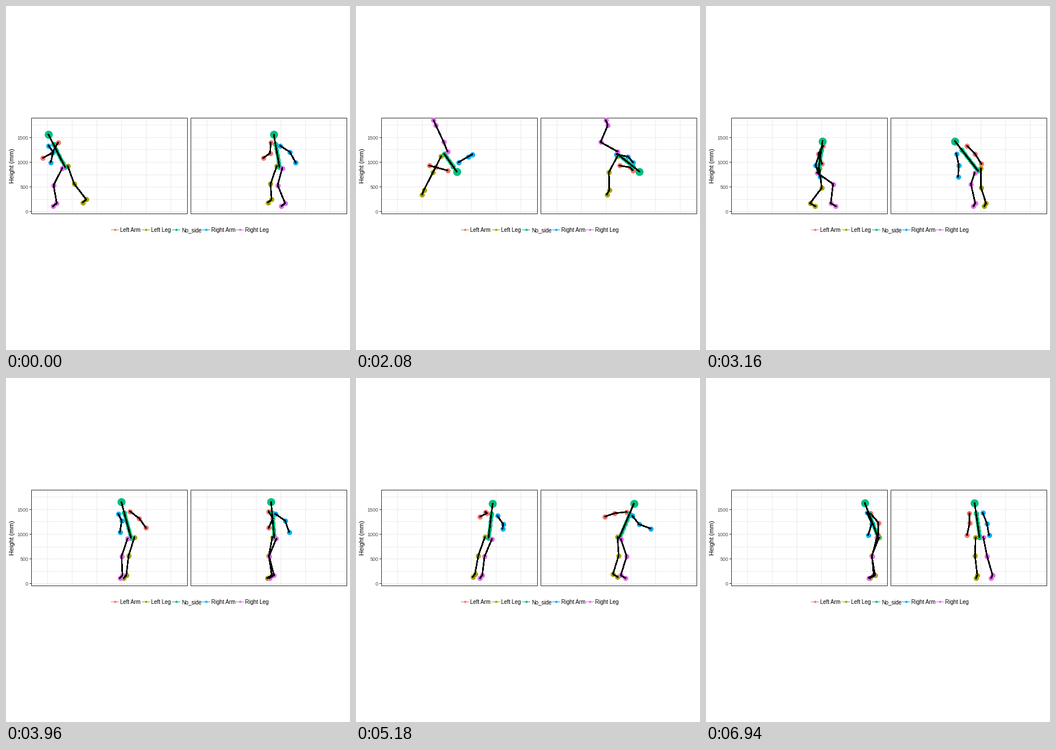
A matplotlib script for the animation above (6960 ms loop, 600 by 600 pixels).

```python
import numpy as np
import matplotlib.pyplot as plt
from matplotlib.animation import FuncAnimation
from matplotlib.patches import Rectangle

PX = 0.72  # points per pixel at 100 dpi
STEP, FRAMES = 20, 348
T = np.arange(FRAMES) * float(STEP)
FLOOR = 344  # ankle height of a standing foot

# Axes: x in the left panel, x in the right panel, y downwards.
# Swing angles: 0 hangs down, 90 points left, 180 up, 270 right.


def glide(*keys):
    """Monotone cubic through rows of (time, values...), one row per frame."""
    keys = np.array(keys, float)
    ts, ys = keys[:, 0], keys[:, 1:]
    h = np.diff(ts)[:, None]
    d = np.diff(ys, axis=0) / h
    m = np.vstack([d[:1], d[1:], d[-1:]])
    prod = d[:-1] * d[1:]
    same = prod > 0
    m[1:-1] = np.where(same, 2 * prod / np.where(same, d[:-1] + d[1:], 1), 0)
    i = np.clip(np.searchsorted(ts, T, side="right") - 1, 0, len(ts) - 2)
    u = (T[:, None] - ts[i, None]) / h[i]
    return ((1 + 2 * u) * (1 - u) ** 2 * ys[i] + u * (1 - u) ** 2 * h[i] * m[i]
            + u * u * (3 - 2 * u) * ys[i + 1] - u * u * (1 - u) * h[i] * m[i + 1])


def unit(v):
    return v / np.maximum(np.linalg.norm(v, axis=1, keepdims=True), 1e-6)


def swing(keys, length, tuck=0, rest=0, drop=np.inf):
    """Vector at a swing angle and sideways offset, never deeper than drop."""
    deg, side = keys.T
    ang = np.radians(deg)
    size = length - tuck * (1 - np.cos(ang - np.radians(rest))) / 2
    r = np.sqrt(size ** 2 - side ** 2)
    r = np.minimum(r, drop / np.maximum(np.cos(ang), 1e-3))
    return np.column_stack([-r * np.sin(ang), side, r * np.cos(ang)])


def middle(start, reach, bone, bend):
    """Knee or elbow between two equal bones, bent towards a direction."""
    axis = unit(reach)
    out = unit(bend - axis * np.sum(bend * axis, axis=1, keepdims=True))
    half = np.linalg.norm(reach, axis=1, keepdims=True) / 2
    return start + reach / 2 + out * np.sqrt(np.maximum(bone ** 2 - half ** 2, 0))


def arm(shoulder, keys):
    reach = swing(keys, 40)
    return [shoulder, middle(shoulder, reach, 21.5, -facing), shoulder + reach]


def leg(hip, keys):
    reach = swing(keys, 68, tuck=16, drop=FLOOR - hip[:, 2])
    ankle = hip + reach
    air = np.clip((FLOOR - 6 - ankle[:, 2:]) / 25, 0, 1)
    toe = (1 - air) * (9 * facing + [0, 0, 5]) + air * 10.5 * unit(reach)
    return [hip, middle(hip, reach, 34.5, facing), ankle, ankle + toe]


# lunge, cartwheel without hands, landing, half turn, steps backwards
pelvis = glide((0, 103, 477, 281), (720, 106, 475, 281), (1200, 112, 473, 286),
               (2080, 154, 456, 258), (2600, 184, 467, 273),
               (3160, 196, 474, 287), (3960, 218, 468, 279),
               (5180, 231, 459, 279), (6940, 300, 477, 278))
yaw = np.radians(glide((0, -135), (1200, -85), (2600, -90), (3160, -20),
                       (3960, -120), (5180, -245), (6940, -165)))
facing = np.column_stack([np.cos(yaw), np.sin(yaw), 0 * yaw])

trunk = swing(glide((0, 153, -7), (720, 167, -4), (1200, 201, -27),
                    (2080, 325, 27), (2850, 493, -14), (3160, 548, -28),
                    (3960, 525, -4), (5180, 547, 18), (6940, 519, -6)),
              46, tuck=9, rest=180)
neck, head = pelvis + trunk, pelvis + 1.42 * trunk
left = unit(np.cross(facing, trunk))

larm = arm(neck + 12 * left, glide(
    (0, 45, -13), (1200, -80, 25), (2080, 105, -23), (3160, 4, 25),
    (3960, -44, 0), (4550, 69, -12), (5180, 49, -38), (6940, -20, -4)))
rarm = arm(neck - 12 * left, glide(
    (0, -7, 27), (1200, 86, 30), (2080, 240, -29), (3160, 358, 3),
    (3960, 355, 24), (5180, 338, 32), (6940, 357, 11)))
lleg = leg(pelvis + 7 * left, glide(
    (0, -29, -9), (1200, -14, -19), (2080, 27, -14), (2600, 192, 32),
    (2850, 362, 34), (3160, 375, 9), (3960, 372, -1), (5180, 375, -8),
    (5700, 333, 2), (6940, 366, 3)))
rleg = leg(pelvis - 7 * left, glide(
    (0, 9, 5), (1200, 27, -11), (2080, 156, -17), (2600, 338, -4),
    (3160, 336, 1), (3960, 368, -4), (5180, 375, 0), (6250, 395, 10),
    (6940, 365, 16)))

# joints, colour, legend label, legend x
LIMBS = [
    (larm, "#F8766D", "Left Arm", 183),
    (lleg, "#A3A500", "Left Leg", 237),
    ([pelvis, neck, head], "#00BF7D", "No_side", 290),
    (rarm, "#00B0F6", "Right Arm", 342),
    (rleg, "#E76BF3", "Right Leg", 401),
]

fig = plt.figure(figsize=(6, 6), dpi=100, facecolor="white")
ax = fig.add_axes([0, 0, 1, 1])
ax.set_xlim(0, 600)
ax.set_ylim(600, 0)
ax.axis("off")


def line(x, y, color, width=1.0, **kw):
    return ax.plot(x, y, color=color, lw=width * PX, **kw)[0]


def dots(color, size, z):
    return ax.plot([], [], "o", color=color, ms=size * PX, mew=0,
                   antialiased=False, zorder=z)[0]


def label(x, y, s, size, **kw):
    ax.text(x, y, s, fontsize=size * PX, family="Liberation Sans", **kw)


# panels
for x0 in (44, 322):
    for y in 358.4 - 21.6 * np.arange(8):
        line([x0, x0 + 272], [round(y)] * 2, "#EBEBEB", zorder=0)
    for x in x0 + 28 + 43 * np.arange(6):
        line([x, x], [195, 362], "#EBEBEB", zorder=0)
    ax.add_patch(Rectangle((x0, 195), 272, 167, fill=False, ec="#333333",
                           lw=PX, zorder=1))
for k in range(4):
    y = round(358.4 - 43.2 * k)
    line([41, 44], [y, y], "#333333", zorder=1)
    label(39, y + 0.8, str(500 * k), 8.8, color="#4D4D4D", ha="right",
          va="center_baseline")
label(11.5, 279, "Height (mm)", 11, rotation=90, ha="center", va="center")

# legend and figure parts
parts = []
for z, (_, color, text, x) in enumerate(LIMBS, 2):
    line([x, x + 13], [390, 390], color)
    ax.plot(x + 7, 390, "o", color=color, ms=4 * PX, mew=0)
    label(x + 16, 394.5, text, 9.6, color="black")
    parts.append((dots(color, 9, z),
                  line([], [], "black", 1.6, antialiased=False, zorder=10)))
spine, skull = dots("#00BF7D", 7, 4), dots("#00BF7D", 14, 4)


def both(p):
    """Points of both panels, separated by a gap."""
    return (np.concatenate([p[:, 0], [np.nan], p[:, 1]]),
            np.concatenate([p[:, 2], [np.nan], p[:, 2]]))


def update(i):
    for (joints, *_), (marks, bones) in zip(LIMBS, parts):
        p = np.array([j[i] for j in joints])
        marks.set_data(*both(p))
        bones.set_data(*both(p))
    spine.set_data(*both(np.linspace(pelvis[i], neck[i], 13)))
    skull.set_data(*both(head[i:i + 1]))


anim = FuncAnimation(fig, update, frames=FRAMES, interval=STEP, repeat=True,
                     repeat_delay=0, blit=False)
plt.show()
```
